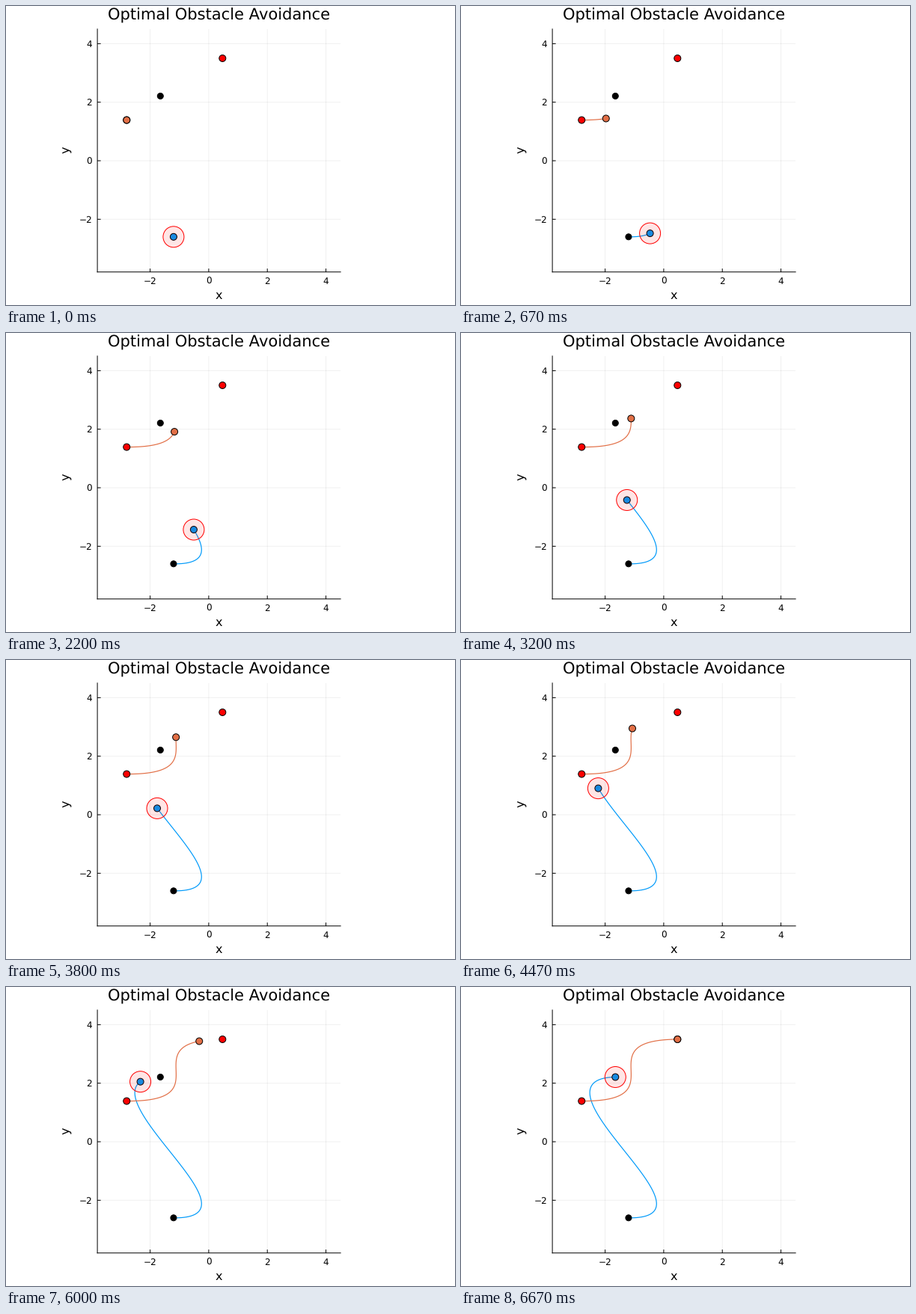
A matplotlib script for the animation above (6740 ms loop, 600 by 400 pixels).

```python
import numpy as np
import matplotlib.pyplot as plt
from matplotlib.animation import FuncAnimation
from matplotlib.patches import Circle

W, H = 600, 400
PX = 0.72                 # points per pixel at 100 dpi
LOOP, TICK = 6740, 20     # ms
STEPS = 100
SPEED = 0.1               # x speed at both ends, units per step
LOW, HIGH = -3.8, 4.5     # limits of both axes
LEFT, BOTTOM, SIDE = 122.1, 355.8, 325
UNIT = SIDE / (HIGH - LOW)
BLUE, ORANGE = "#009AFA", "#E26F46"

plt.rcParams.update({"font.family": "DejaVu Sans", "path.snap": False,
                     "text.hinting": "none", "text.hinting_factor": 1})


def glide(start, goal, speed):
    """Least-effort path of a stepped double integrator, same speed at both ends."""
    k = np.arange(STEPS + 1)
    pairs = k * (k - 1) / 2
    triples = pairs * (k - 2) / 3
    lean = (STEPS - 1) / 2
    jerk = (goal - start - speed * STEPS) / (triples[-1] - lean * pairs[-1])
    return start + speed * k + jerk * (triples - lean * pairs)


s = np.linspace(0, 1, STEPS + 1)
detour = s**2 * (1 - s)**2

blue_x = glide(-1.2, -1.65, SPEED) - 0.35 * detour
blue_y = glide(-2.6, 2.21, 0) - 1.5 * s * detour
orange_x = glide(-2.8, 0.47, SPEED)
orange_y = glide(1.39, 3.5, 0)

fig = plt.figure(figsize=(W / 100, H / 100), dpi=100, facecolor="white")
ax = fig.add_axes([LEFT / W, 1 - BOTTOM / H, SIDE / W, SIDE / H])
ax.set(xlim=(LOW, HIGH), ylim=(LOW, HIGH))
ticks = [-2, 0, 2, 4]
ax.set_xticks(ticks)
ax.set_yticks(ticks)
ax.set_axisbelow(True)
ax.grid(color="black", alpha=0.06, linewidth=PX)
ax.tick_params(length=0, labelbottom=False, labelleft=False)
ax.spines[["top", "right"]].set_visible(False)
ax.spines[["left", "bottom"]].set_linewidth(PX)


def label(x, y, text, size, ha="center", turn=0):
    fig.text(x / W, 1 - y / H, text, fontsize=size * PX, ha=ha, va="baseline",
             rotation=turn, rotation_mode="anchor")


label(284.6, 19, "Optimal Obstacle Avoidance", 20.83)
label(284.6, 392, "x", 16.37)
label(85.5, 192.4, "y", 16.37, turn=90)

x_zero, y_zero = LEFT - LOW * UNIT, BOTTOM + LOW * UNIT
inner = LOW + 4 / UNIT
for t in ticks:
    name = str(t).replace("-", "\u2212")
    label(x_zero - 0.3 + t * UNIT, 372, name, 11.9)
    label(115, y_zero + 4.4 - t * UNIT, name, 11.9, ha="right")
    ax.plot([t, t], [LOW, inner], color="black", linewidth=PX)
    ax.plot([LOW, inner], [t, t], color="black", linewidth=PX)


def disc(x, y, radius, fill, edge="black", z=4):
    return ax.add_patch(Circle((x, y), radius / UNIT, facecolor=fill,
                               edgecolor=edge, linewidth=PX, zorder=z))


def trail(color):
    return ax.plot([], [], color=color, linewidth=1.2 * PX, zorder=3)[0]


for end in (0, -1):
    disc(blue_x[end], blue_y[end], 4, "black")
    disc(orange_x[end], orange_y[end], 4.5, "red")

movers = [
    (blue_x, blue_y, trail(BLUE), disc(0, 0, 4.5, BLUE, z=5)),
    (orange_x, orange_y, trail(ORANGE), disc(0, 0, 4.5, ORANGE, z=5)),
]
zone = disc(0, 0, 14, (1, 0, 0, 0.1), edge="red", z=6)


def update(i):
    k = min(int((i * TICK + 10) * 3 / 200), STEPS)
    for xs, ys, line, head in movers:
        line.set_data(xs[:k + 1], ys[:k + 1])
        head.center = xs[k], ys[k]
    zone.center = blue_x[k], blue_y[k]
    return []


anim = FuncAnimation(fig, update, frames=LOOP // TICK, interval=TICK,
                     init_func=lambda: update(0), repeat=True, repeat_delay=0)
plt.show()
```
